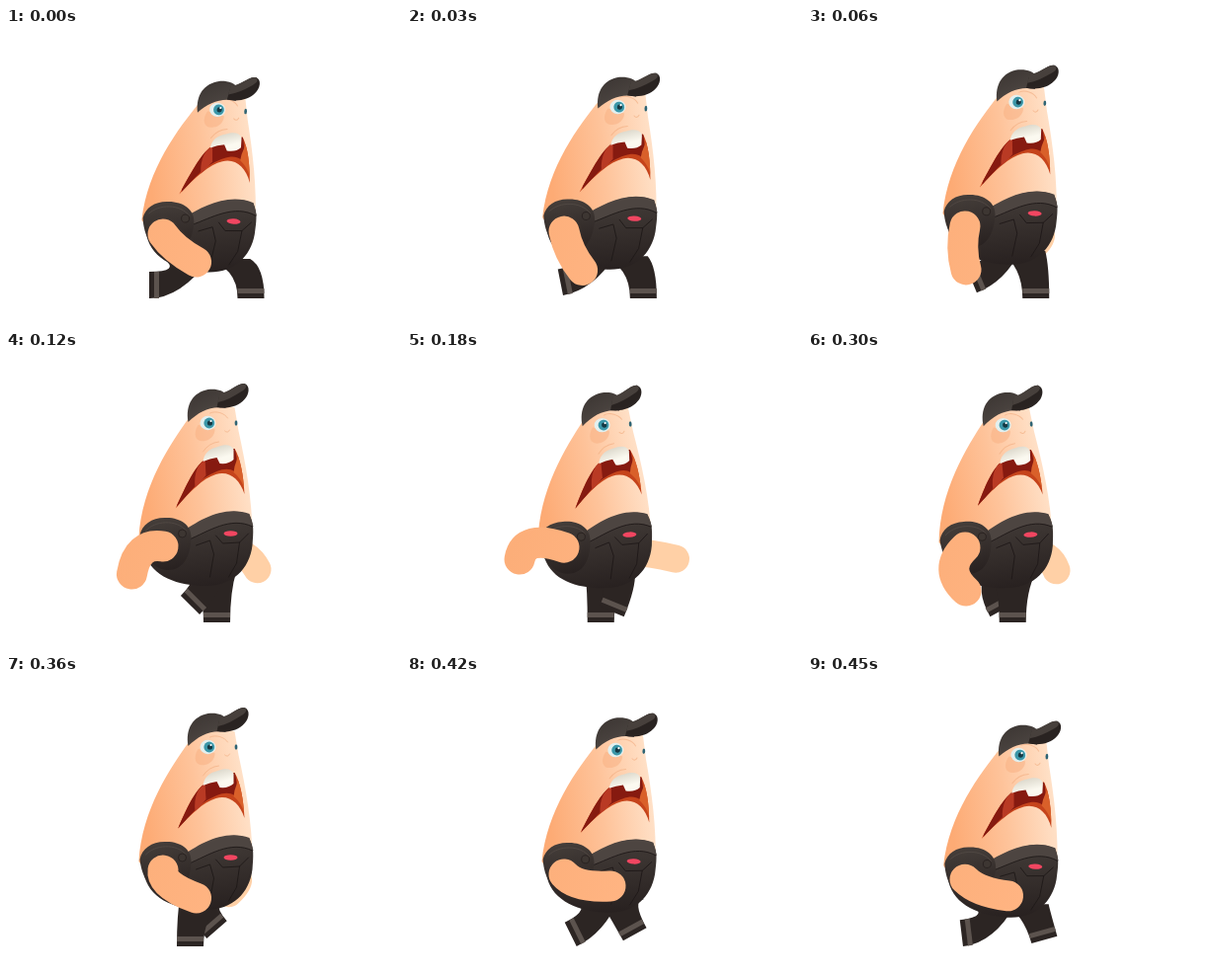
Write an HTML page that moves like this. It is 400 px wide and 300 px high and loops after 480 ms.

```html
<!DOCTYPE html>
<html lang="en">
<head>
<meta charset="utf-8">
<title>Walk cycle</title>
<style>
  html, body { margin: 0; width: 100%; height: 100%; overflow: hidden; background: #fff; }
  svg { display: block; width: 100vw; height: 100vh; }
  .line { fill: none; stroke-linecap: round; stroke-linejoin: round; }
  .leg { fill: #2c2523; }
  .cuff { stroke: #5c534e; stroke-width: 27; }
  .arm { fill: none; stroke-linecap: round; }
</style>
</head>
<body>
<svg viewBox="0 0 400 300">
  <defs>
    <linearGradient id="skin" gradientUnits="userSpaceOnUse" x1="142" y1="150" x2="250" y2="132">
      <stop offset="0" stop-color="#fdab75"/>
      <stop offset=".5" stop-color="#fec39a"/>
      <stop offset="1" stop-color="#ffe3cb"/>
    </linearGradient>
    <linearGradient id="limb" gradientUnits="userSpaceOnUse" x1="105" y1="200" x2="215" y2="225">
      <stop offset="0" stop-color="#fcae79"/>
      <stop offset="1" stop-color="#ffb482"/>
    </linearGradient>
    <linearGradient id="cloth" x1=".4" y1="0" x2=".6" y2="1">
      <stop offset="0" stop-color="#453e3a"/>
      <stop offset="1" stop-color="#282120"/>
    </linearGradient>
    <linearGradient id="dome" x1="0" y1="0" x2=".6" y2="1">
      <stop offset="0" stop-color="#3a3431"/>
      <stop offset="1" stop-color="#504945"/>
    </linearGradient>
    <linearGradient id="teeth" x1="0" y1="0" x2=".5" y2="1">
      <stop offset="0" stop-color="#cfcbbd"/>
      <stop offset=".8" stop-color="#fbf9f0"/>
    </linearGradient>
    <clipPath id="inMouth"><path id="lips"/></clipPath>
  </defs>

  <path id="farArm" class="arm" stroke="#ffd0a6" stroke-width="28"/>
  <g id="farLeg"><path class="leg"/><path class="cuff"/></g>
  <g id="nearLeg"><path class="leg"/><path class="cuff"/></g>

  <g id="body">
    <path fill="url(#skin)" d="M187 65C166 94 138 136 135 188L150 208L240 205L250 186C250 150 243 112 236 80L232 56L205 50Z"/>

    <path fill="#f7b084" opacity=".55" d="M195 74C189 84 193 92 202 90C208 89 212 84 212 78Z"/>
    <path class="line" stroke="#f0ab7d" opacity=".6" d="M207 62C213 59 222 62 225 67M222 80Q225 83 227 79M200 101Q206 92 216 91"/>
    <ellipse cx="205" cy="72" rx="8" ry="7.2" fill="#e3f0ef"/>
    <circle cx="206.300" cy="72" r="5.4" fill="#3b97a9"/>
    <circle cx="207" cy="72" r="2.6" fill="#143843"/>
    <circle cx="208" cy="70" r="1.1" fill="#fff"/>
    <ellipse cx="233.500" cy="72" rx="1.4" ry="2.800" fill="#2e6474"/>

    <path id="mouth" fill="#c5431b"/>
    <g clip-path="url(#inMouth)">
      <path fill="#861a10" d="M174 158C193 132 202 126 214 121C226 116 233 120 237 127L232 95H204L172 142Z"/>
      <path fill="#b93a24" d="M192 138C190 122 196 112 202 108L203 125Z"/>
      <path fill="#d9602a" d="M232 116L238 98L245 148C241 134 238 128 231 122Z"/>
    </g>
    <path fill="url(#teeth)" d="M200 111C201 103 206 98 215 96C223 93 229 94 231 99L231 109Q226 114 217 113L214 107Q207 108 200 111Z"/>

    <path fill="url(#cloth)" d="M138 186C146 180 176 184 190 177C207 165 230 157 247 165C252 174 251 183 250 196C247 220 230 237 203 237C175 237 148 228 141 204Z"/>
    <path fill="#4d4541" d="M178 183C195 171 221 155 247 164L251 177C228 166 205 182 186 190Z"/>
    <path class="line" stroke="#1f1918" stroke-width=".9" d="M186 190C205 182 228 166 250 177M193 196L207 191L211 205L207 228M213 186L220 194L237 193L246 184M237 193L234 214L226 228"/>
    <ellipse cx="228" cy="184" rx="7" ry="2.700" fill="#f14661"/>

    <path fill="url(#cloth)" d="M136 186C138 175 148 168 161 168C176 167 188 175 188 187C188 202 183 222 163 221C147 219 138 204 136 186Z"/>
    <path class="line" stroke="#544b46" stroke-width=".8" d="M142 181C151 171 173 169 183 181"/>
    <circle cx="179" cy="184" r="4" fill="#3d3632" stroke="#2a2321"/>

    <g id="cap">
      <path fill="url(#dome)" d="M185 70C182 52 190 40 205 37C214 36 221 38 224 43L223 56C209 53 196 59 185 70Z"/>
      <path fill="#292321" d="M217 42C227 40 235 30 242 31C248 33 247 42 242 47C236 54 225 57 214 55Z"/>
      <path fill="#47403c" d="M217 41C227 40 235 30 242 31C245 33 244 36 239 39C231 44 224 48 215 50Z"/>
    </g>
  </g>

  <path id="nearArm" class="arm" stroke="url(#limb)" stroke-width="31"/>
</svg>

<script>
const LOOP = 480, STEP = 30;
const { sin, cos, PI } = Math;
const $ = id => document.getElementById(id);
const setPath = (el, d) => el.setAttribute('d', d);

// Planted half a cycle moving back, then swinging forward.
// kick turns the foot up behind, lead turns it ahead during the swing.
function drawLeg(id, t, { front, back, kick, lead }, hipY) {
  const half = t * 2 % 2, u = half % 1, planted = half < 1;
  const turn = planted
    ? kick * Math.max(0, -cos(PI * u))
    : kick * (1 - u) - lead * sin(PI * u);
  const a = (90 + turn) * PI / 180;
  const lift = 13.5 * Math.abs(cos(a)) + (planted ? 0 : 8 * sin(PI * u));
  const x = planted ? front + (back - front) * u : back + (front - back) * u;
  const y = 274 - lift;

  // Point some way up the shin, offset sideways
  const pt = (up, side) =>
    `${x - up * cos(a) - side * sin(a)} ${y - up * sin(a) + side * cos(a)}`;
  const hip = 205 + (x - 200) * .4;
  const [shin, cuff] = $(id).children;
  setPath(shin, `M${hip - 23} ${hipY}Q${pt(32, 13.5)} ${pt(0, 13.5)}`
    + `L${pt(0, -13.5)}Q${pt(32, -13.5)} ${hip + 23} ${hipY}Z`);
  setPath(cuff, `M${pt(10, 0)}L${pt(5, 0)}`);
}

function drawNearArm(phi, y) {
  const c = cos(phi + PI / 4), s = sin(phi + PI / 4);
  const elbow = `${145 + 26 * c + 9 * s} ${y + 22 * s ** 4 + 14 * c}`;
  const hand = `${160 + 46 * c} ${y + 12 + 32 * s * s}`;
  setPath($('nearArm'), `M159 ${y}Q${elbow} ${hand}`);
}

function drawFarArm(phi, y) {
  const k = -cos(phi + .44);
  setPath($('farArm'), `M225 ${y}Q245 ${y} ${240 + 34 * k} ${223 - 15 * k * k}`);
}

function drawMouth(open) {
  const corner = `${175 - 5 * open} ${154 + 8 * open}`;
  const d = `M${corner}C183 135 192 115 203 108L232 98C238 108 241 125 242 144`
    + `C237 128 226 120 213 124C200 128 187 141 ${corner}Z`;
  setPath($('mouth'), d);
  setPath($('lips'), d);
}

// t runs from 0 to 1 over one loop
function draw(t) {
  const phi = 2 * PI * t, sway = cos(phi), dip = sway ** 4;
  const x = 227.5 + 3 * sway, y = 184 + 2 * sway + 10 * dip;

  $('body').setAttribute('transform',
    `translate(${x} ${y}) rotate(${3.4 * sway}) translate(-228 -184)`);
  $('cap').setAttribute('transform', `translate(0 ${1 + 5 * dip})`);
  drawMouth(.3 + .5 * cos(phi - PI / 6));
  drawNearArm(phi, y + 13);
  drawFarArm(phi, y + 18);
  drawLeg('nearLeg', t + .5, { front: 228, back: 145, kick: 90, lead: 0 }, y + 38);
  drawLeg('farLeg', t, { front: 248, back: 179, kick: 0, lead: 41 }, y + 38);
}

function tick() {
  draw(Math.floor(performance.now() % LOOP / STEP) * STEP / LOOP);
  requestAnimationFrame(tick);
}
tick();
</script>
</body>
</html>
```
